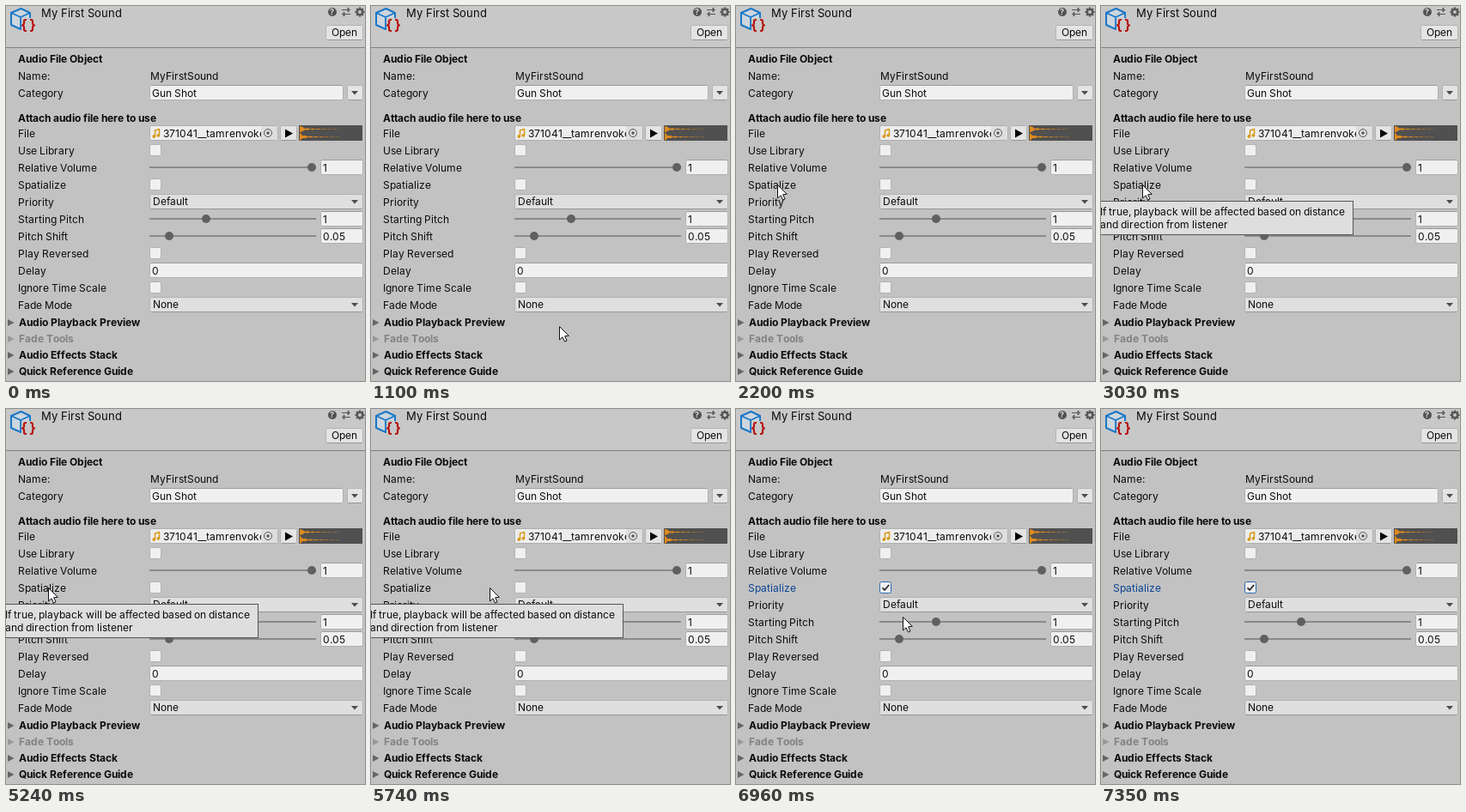
These frames come from a looping animation (418x437 px, 7960 ms). An HTML page with a canvas:

```html
<!DOCTYPE html>
<html lang="en">
<head>
<meta charset="utf-8">
<title>Inspector</title>
<style>
html, body { margin: 0; width: 100%; height: 100%; overflow: hidden; background: #c2c2c2; }
canvas { display: block; width: 418px; height: 437px; }
</style>
</head>
<body>
<canvas id="c" width="418" height="437"></canvas>
<script>
const g = document.getElementById('c').getContext('2d');
const W = 418, H = 437, LOOP = 7960, STEP = 30;
const INK = '#0b0b0b', BLUE = '#0a4496', FIELD = '#f0f0f0', EDGE = '#b2b2b2';

// Glyphs sit on whole pixels, as in a hinted UI font
function text(s, x, y, color = INK, bold = false, size = 12) {
  g.font = `${bold ? 'bold ' : ''}${size}px Inter, sans-serif`;
  g.fillStyle = color;
  for (const ch of s) {
    g.fillText(ch, x, y);
    x += Math.round(g.measureText(ch).width);
  }
}

function box(x, y, w, h, fill, line, r = 2) {
  g.beginPath();
  g.roundRect(x + .5, y + .5, w - 1, h - 1, r);
  g.fillStyle = fill;
  g.fill();
  g.strokeStyle = line;
  g.lineWidth = 1;
  g.stroke();
}

function poly(pts, fill, line, w = 1) {
  g.beginPath();
  for (let i = 0; i < pts.length; i += 2) g.lineTo(pts[i], pts[i + 1]);
  g.closePath();
  if (fill) { g.fillStyle = fill; g.fill(); }
  if (line) { g.strokeStyle = line; g.lineWidth = w; g.stroke(); }
}

function path(d, color, w) {
  g.strokeStyle = color;
  g.lineWidth = w;
  g.stroke(new Path2D(d));
}

function dot(x, y, r, color) {
  g.beginPath();
  g.arc(x, y, r, 0, 7);
  g.fillStyle = color;
  g.fill();
}

function ring(x, y, r, w) {
  g.beginPath();
  g.arc(x, y, r, 0, 7);
  g.strokeStyle = '#555';
  g.lineWidth = w;
  g.stroke();
}

function field(s, x, y, w) {
  box(x, y, w, 18, FIELD, '#b0b0b0');
  g.fillStyle = '#9c9c9c';
  g.fillRect(x + 2, y, w - 4, 1);
  text(s, x + 3, y + 14);
}

function button(x, y, w, fill = '#e4e4e4') {
  box(x, y, w, 18, fill, EDGE);
  g.fillStyle = '#969696';
  g.fillRect(x + 2, y + 17, w - 4, 1);
}

const arrowDown = (x, y) => poly([x - 4, y - 2, x + 4, y - 2, x, y + 2.5], '#4c4c4c');

function dropdown(s, y) {
  button(167, y, 249, '#dfdfdf');
  text(s, 171, y + 13);
  arrowDown(406, y + 9);
}

function slider(y, x, s) {
  g.fillStyle = '#8a8a8a';
  g.fillRect(167, y - 1, 194, 2);
  dot(x, y, 5, '#606060');
  field(s, 366, y - 9, 50);
}

function check(y, line = EDGE, on = false) {
  box(167, y - 7, 14, 14, FIELD, line);
  if (on) path(`M170.5 ${y + .3}l2.6 2.7 5-6`, '#222', 1.7);
}

function header() {
  g.fillStyle = '#c8c8c8';
  g.fillRect(0, 0, W, 48);
  g.fillStyle = '#808080';
  g.fillRect(0, 48, W, 1);

  // Cube with braces
  g.lineJoin = 'round';
  poly([6, 8, 17.5, 3, 28, 8, 28, 22, 17, 27, 6, 22], '#cdd6de', '#1877c8', 2);
  path('M6 8L17 13 28 8M17 13V27', '#1877c8', 1.8);
  g.fillStyle = '#c8c8c8';
  g.fillRect(18, 14, 15, 17);
  path('M24 16h-1q-2 0-2 2v2q0 2-2 2.5q2 .5 2 2.5v2q0 2 2 2h1'
     + 'M28 16h1q2 0 2 2v2q0 2 2 2.5q-2 .5-2 2.500v2q0 2-2 2h-1', '#b81414', 2.2);
  text('My First Sound', 41, 13, INK, false, 13);

  // Help, presets, gear
  dot(380, 7, 5, '#515151');
  text('?', 377, 10, '#e0e0e0', true, 9);
  path('M391 4.5h10M391 9.5h10', '#555', 1.2);
  path('M398.5 2v5M393.5 7v5', '#555', 1.8);
  for (let i = 0; i < 8; i++) {
    g.save();
    g.translate(412, 7);
    g.rotate(i * Math.PI / 4);
    g.fillStyle = '#555';
    g.fillRect(-1.2, -5.5, 2.4, 3);
    g.restore();
  }
  ring(412, 7, 3, 2);

  button(372, 22, 44);
  text('Open', 379, 35);
}

function fileRow() {
  box(167, 139, 150, 18, '#ededed', '#b0b0b0');
  g.fillStyle = '#dedede';
  g.fillRect(297, 140, 19, 16);
  path('M173.5 152v-7l5-1.5v7', '#d89a18', 1.5);
  dot(172.3, 152, 1.9, '#d89a18');
  dot(177.3, 150.8, 1.9, '#d89a18');
  g.save();
  g.beginPath();
  g.rect(182, 139, 115, 18);
  g.clip();
  text('371041__tamrenvokel', 183, 153);
  g.restore();
  ring(305, 148, 4.5, 1);
  dot(305, 148, 1.7, '#555');

  button(319, 139, 20);
  poly([325, 143.5, 334, 148.5, 325, 153.5], '#050505');

  g.fillStyle = '#505050';
  g.fillRect(341, 139, 74, 18);
  g.fillStyle = '#e08a1c';
  for (const mid of [143.5, 152.5]) {
    for (let i = 0; i < 46; i++) {
      const a = 3 * Math.exp(-i / 3) + (1 + .5 * Math.sin(i * 7.3 + mid)) * Math.exp(-i / 20);
      g.fillRect(342 + i, mid - a, 1, 2 * a);
    }
  }
}

function foldout(s, y, color, mark) {
  poly([2, y - 4, 9.5, y, 2, y + 4], mark);
  text(s, 15, y + 4, color, true);
}

function panel(t) {
  g.fillStyle = '#c2c2c2';
  g.fillRect(0, 0, W, H);
  header();

  text('Audio File Object', 14, 66, INK, true);
  text('Name:', 14, 86);
  text('MyFirstSound', 168, 86);
  text('Category', 14, 106);
  field('Gun Shot', 167, 92, 226);
  button(397, 92, 19, '#e4e4e4');
  arrowDown(406, 101);
  text('Attach audio file here to use', 14, 135, INK, true);

  const labels = ['File', 'Use Library', 'Relative Volume', 'Spatialize', 'Priority', 'Starting Pitch',
    'Pitch Shift', 'Play Reversed', 'Delay', 'Ignore Time Scale', 'Fade Mode'];
  labels.forEach((s, i) => text(s, 14, 153 + 20 * i, i === 3 && t >= 6080 ? BLUE : INK));

  fileRow();
  check(168);
  slider(188, 356, '1');
  check(208, t >= 6080 ? '#2a68b0' : t >= 5930 ? '#7c7c7c' : EDGE, t >= 6170);
  dropdown('Default', 219);
  slider(248, 233, '1');
  slider(268, 190, '0.05');
  check(288);
  field('0', 167, 299, 249);
  check(328);
  dropdown('None', 339);

  foldout('Audio Playback Preview', 369, INK, '#666');
  foldout('Fade Tools', 388, '#828282', '#999');
  foldout('Audio Effects Stack', 407, INK, '#666');
  foldout('Quick Reference Guide', 426, INK, '#666');
}

function tooltip() {
  g.fillStyle = '#555';
  g.fillRect(0, 227, 294, 40);
  g.fillStyle = '#dedede';
  g.fillRect(0, 228, 293, 38);
  text('If true, playback will be affected based on distance', -1, 244);
  text('and direction from listener', -1, 259);
}

// Start, end, from x/y, to x/y, easing
const moves = [
  [880, 2200, 281, 433, 49, 209, p => 1 - (1 - p) ** 1.76],
  [5240, 5960, 50, 209, 170, 209, p => p * p * (3 - 2 * p)],
  [6810, 7350, 170, 209, 343, 438, p => p ** 1.5]
];

function cursorAt(t) {
  if (t < 880 || t >= 7350) return null;
  const [a, b, x0, y0, x1, y1, ease] = moves.filter(m => t >= m[0]).pop();
  const k = ease(Math.min(1, Math.floor((t - a) / STEP) * STEP / (b - a)));
  return [Math.round(x0 + (x1 - x0) * k), Math.round(y0 + (y1 - y0) * k)];
}

// Number labels can be dragged sideways
const dragRows = [180, 240, 260, 300];
const draggable = (x, y) => x < 166 && dragRows.some(r => y >= r - 1 && y < r + 18);

function cursor(x, y) {
  g.save();
  g.translate(x - 1, y - 1);
  g.lineJoin = 'miter';
  if (draggable(x, y)) {
    for (const s of [-1, 1]) {
      poly([s * 10, 1.5, s * 5.5, -2.5, s * 5.5, 5.5].map((v, i) => i % 2 ? v : v + 1.5),
        '#fff', '#1a1a2a');
    }
  }
  poly([.5, .5, .5, 16, 4, 12.8, 6.5, 18, 9, 17, 6.7, 11.7, 11.3, 11.3], '#fff', '#101018');
  g.restore();
}

function draw(t) {
  panel(t);
  if (t >= 3030 && t < 6080) tooltip();
  const at = cursorAt(t);
  if (at) cursor(...at);
}

const start = performance.now();
function tick(now) {
  draw(Math.max(0, now - start) % LOOP);
  requestAnimationFrame(tick);
}
draw(0);
requestAnimationFrame(tick);
</script>
</body>
</html>
```
